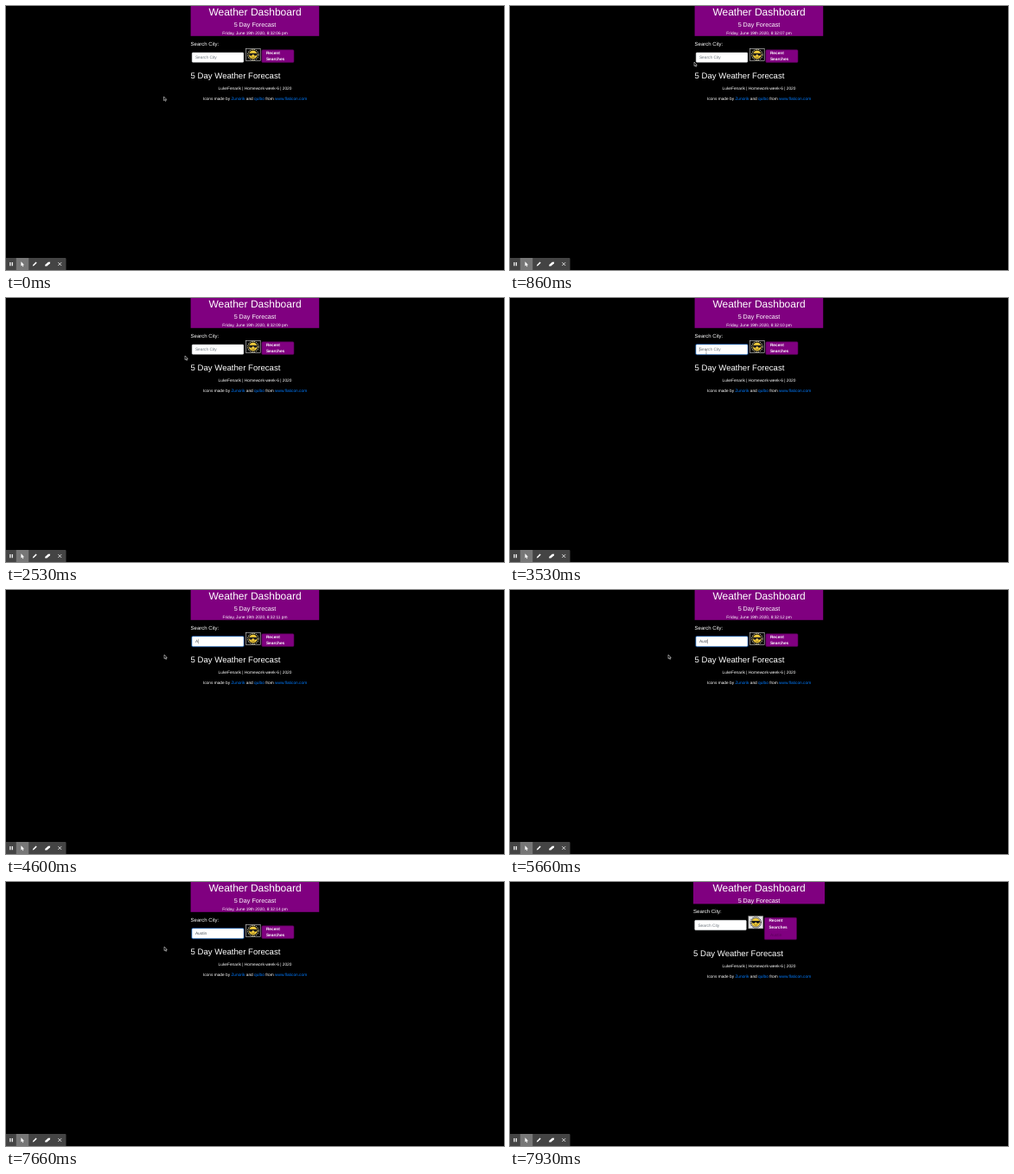
An HTML page for the animation above (8 s loop, 576 by 306 pixels).

```html
<!DOCTYPE html>
<html lang="en">
<head>
<meta charset="utf-8">
<title>Weather Dashboard</title>
<style>
  html, body { margin: 0; width: 100%; height: 100%; overflow: hidden; background: #000; }
  svg { display: block; width: 576px; height: 306px; }
  text { font: 4.8px "Liberation Sans", Arial, sans-serif; fill: #fff; text-rendering: geometricPrecision; white-space: pre; }
  .mid { text-anchor: middle; }
  .link { fill: #007bff; }
  .bold { font-weight: bold; }
</style>
</head>
<body>
<svg viewBox="0 0 576 306">
  <rect id="header" fill="#800080"/>
  <text class="mid" x="288" y="11.3" style="font-size:12px">Weather Dashboard</text>
  <text class="mid" x="288" y="23.5" style="font-size:7.2px">5 Day Forecast</text>
  <text id="date" class="mid" x="288" y="32.8"></text>

  <g id="search">
    <text x="213.6" y="45.5" style="font-size:6px">Search City:</text>
    <rect id="glow" x="214.3" y="53.1" width="61.4" height="13.2" rx="1.8" fill="#007bff" opacity=".4"/>
    <rect id="field" x="215.15" y="53.95" width="59.7" height="11.4" rx="1.1" fill="#fff" stroke-width=".4"/>
    <text id="entry" x="218.9" y="61.2"></text>
    <rect id="caret" y="56.8" width=".35" height="5.6" fill="#333"/>

    <g id="icon">
      <rect id="tile" x="277.4" y="49.3" width="16.8" height="14.2" stroke-width=".6"/>
      <circle id="rays" cx="285.8" cy="56.5" r="6.2" fill="none" stroke-width="1" stroke-dasharray="1.5 .93"/>
      <circle cx="285.8" cy="56.5" r="5.1" fill="#f5cf3c" stroke="#222" stroke-width=".5"/>
      <path d="M281 54.7h9.6v1q-.5 2-2.3 2t-2.1-1.7h-.8q-.3 1.7-2.1 1.7t-2.3-2z" fill="#1c1c1c"/>
      <path d="M283.6 58.9q2.2 1.7 4.4 0" fill="none" stroke="#55400a" stroke-width=".6"/>
    </g>

    <rect id="recent" x="295.8" y="50.8" width="37.2" rx="1.2" fill="#800080" stroke="#4d004d" stroke-width=".6"/>
    <text class="bold" x="300.9" y="56">Recent</text>
    <text class="bold" x="300.9" y="63.2">Searches</text>
    <text id="saved" x="302.5" y="72.3" style="fill:#5c005c">Austin</text>
  </g>

  <g id="below">
    <text x="213.6" y="84" style="font-size:9.6px" id="heading">5 Day Weather Forecast</text>
    <text class="mid" x="288" y="96.8">LukeFenarik | Homework-week-6 | 2020</text>
    <text class="mid" x="288" y="108.7">Icons made by <tspan class="link">Zunorik</tspan> and <tspan class="link">qulbo</tspan> from <tspan class="link">www.flaticon.com</tspan></text>
  </g>

  <g id="toolbar" fill="#fff">
    <path d="M0 292h68.5q1 0 1 1v13H0z" fill="#444"/>
    <rect x="11.8" y="292" width="14.4" height="14" fill="#777"/>
    <path d="M4.3 296.9h1.2v4.4H4.3zM6.7 296.9h1.2v4.4H6.7z"/>
    <path d="M17.4 296.2v5.4l1.2-1 .8 1.7.8-.4-.8-1.6h1.7z"/>
    <path d="M30.8 301.6l.4-1.6 3.4-3.4 1.1 1.1-3.4 3.4z"/>
    <path d="M45.2 300l3.6-3.2h2.4l-.4 1.7-3.4 3.1h-2.2z"/>
    <path d="M60.3 297.1l3.9 3.9m0-3.9l-3.9 3.9" stroke="#fff" stroke-width=".75"/>
  </g>

  <path id="arrow" d="M0 0v4.6l1.1-.9.8 1.7.8-.4-.8-1.6h1.4z" fill="#000" stroke="#fff" stroke-width=".5"/>
  <path id="beam" d="M-.8-2.6h1.6M0-2.6v5.2M-.8 2.6h1.6" fill="none" stroke="#555" stroke-width=".4"/>
</svg>
<script>
const LOOP = 8000, FOCUS = 3200, RELOAD = 7800, FIRST_TICK = 260;
const path = [
  [0, 182.5, 105], [130, 182.5, 105], [860, 213, 65], [1000, 213, 65],
  [1800, 175.5, 80], [2200, 175.5, 80], [2530, 207, 67], [2930, 227, 62.5],
  [3530, 227, 62.5], [3800, 183, 75], [LOOP, 183, 75]
];
const keys = [[4400, "A"], [4930, "Au"], [5200, "Aus"], [5460, "Aust"], [5760, "Austi"], [5900, "Austin"]];
const charWidth = { A: .667, u: .556, s: .5, t: .278, i: .222, n: .556 };

const $ = id => document.getElementById(id);
const set = (id, attrs) => {
  for (const name in attrs) $(id).setAttribute(name, attrs[name]);
};
const show = (id, on) => set(id, { visibility: on ? "visible" : "hidden" });
const label = (id, text) => { if ($(id).textContent !== text) $(id).textContent = text; };

function pointerAt(t) {
  const i = path.findIndex(p => p[0] > t);
  const [t0, x0, y0] = path[i - 1], [t1, x1, y1] = path[i];
  const u = (t - t0) / (t1 - t0), k = u * u * (3 - 2 * u);
  return [x0 + (x1 - x0) * k, y0 + (y1 - y0) * k];
}

function drawPage(reloaded, t) {
  const second = 6 + Math.max(0, Math.floor((t - FIRST_TICK) / 1000) + 1);
  label("date", reloaded ? "" : `Friday, June 19th 2020, 8:32:${String(second).padStart(2, "0")} pm`);
  set("header", reloaded
    ? { x: 212, y: 0, width: 152, height: 25.4 }
    : { x: 213.6, y: 0, width: 148.6, height: 34.8 });
  set("search", { transform: reloaded ? "translate(-1.5 -9.6)" : "" });
  set("below", { transform: reloaded ? "translate(0 2)" : "" });
  set("heading", { x: reloaded ? 212.1 : 213.6 });
  set("recent", { height: reloaded ? 25.6 : 14.6 });
  set("tile", reloaded ? { fill: "#e4e4e4", stroke: "#999" } : { fill: "#0b0b0b", stroke: "#ccc" });
  set("rays", { stroke: reloaded ? "#222" : "#e8dfb0" });
  show("saved", reloaded);
}

function drawField(focused, t) {
  const typed = focused ? keys.filter(k => k[0] <= t) : [];
  const [lastKey, value] = typed.length ? typed[typed.length - 1] : [FOCUS, ""];
  label("entry", value || "Search City");
  $("entry").style.fill = value ? "#495057" : "#6c757d";
  set("field", { stroke: focused ? "#80bdff" : "#ced4da" });
  show("glow", focused);
  const width = [...value].reduce((sum, c) => sum + charWidth[c] * 4.8, 0);
  set("caret", { x: 218.9 + width });
  show("caret", focused && (t - lastKey) % 1000 < 500);
}

function drawPointer(visible, t) {
  const [x, y] = pointerAt(t);
  const overField = x > 215 && x < 275 && y > 54 && y < 65.4;
  for (const id of ["arrow", "beam"]) set(id, { transform: `translate(${x} ${y})` });
  show("arrow", visible && !overField);
  show("beam", visible && overField);
}

function render(t) {
  const reloaded = t >= RELOAD;
  drawPage(reloaded, t);
  drawField(t >= FOCUS && !reloaded, t);
  drawPointer(!reloaded, t);
}

const start = performance.now();
function frame() {
  render((performance.now() - start) % LOOP);
  requestAnimationFrame(frame);
}
frame();
</script>
</body>
</html>
```
